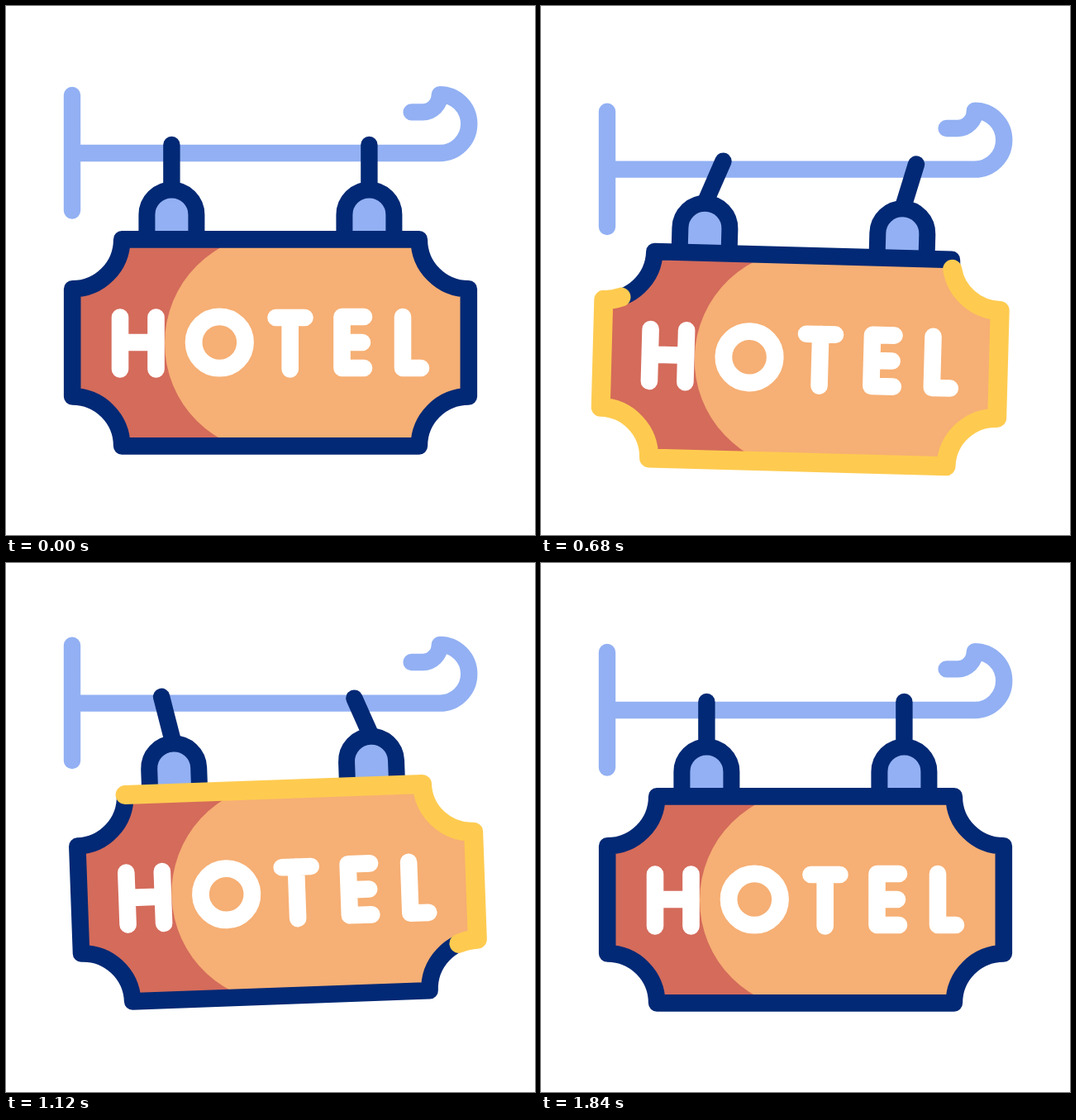
Write an HTML page with a canvas that moves like this. It is 640 px wide and 640 px high and loops after 2 s.

```html
<!DOCTYPE html>
<html lang="en">
<head>
<meta charset="utf-8">
<title>Hanging hotel sign</title>
<style>
  html, body { margin: 0; width: 100%; height: 100%; overflow: hidden; background: #fff; }
  canvas { display: block; width: 100vmin; height: 100vmin; }
</style>
</head>
<body>
<canvas id="stage" width="640" height="640" role="img" aria-label="HOTEL"></canvas>
<script>
const ctx = document.getElementById('stage').getContext('2d');
const SKY = '#92b0f3', NAVY = '#022975', RED = '#d46b5b', SAND = '#f6af74', GOLD = '#fecb50';
const LOOP = 2000, STEP = 40;
const BAR_Y = 178, HALF = Math.PI / 2;
const box = { l: 80.2, r: 559.8, t: 282.4, b: 532.4, notch: 60 };

// Swing keyframe times: rest, low point, high point, rest.
const KEYS = [130, 565, 1145, 1735];

function ease(t, from, to) {
  const x = Math.min(1, Math.max(0, (t - from) / (to - from)));
  return 0.5 - 0.5 * Math.cos(Math.PI * x);
}

// Goes from rest to low, to high and back to rest.
function swing(t, rest, low, high) {
  const values = [rest, low, high, rest];
  let v = rest;
  for (let i = 0; i < 3; i++) {
    v += (values[i + 1] - values[i]) * ease(t, KEYS[i], KEYS[i + 1]);
  }
  return v;
}

function stroke(path, color, width) {
  ctx.strokeStyle = color;
  ctx.lineWidth = width;
  ctx.stroke(path);
}

function fill(path, color) {
  ctx.fillStyle = color;
  ctx.fill(path);
}

function boardPath() {
  const { l, r, t, b, notch } = box;
  const p = new Path2D();
  p.moveTo(l + notch, t);
  p.arc(l, t, notch, 0, HALF);
  p.arc(l, b, notch, -HALF, 0);
  p.arc(r, b, notch, 2 * HALF, 3 * HALF);
  p.arc(r, t, notch, HALF, 2 * HALF);
  p.lineTo(l + notch, t);
  return p;
}

const board = boardPath();
const boardLength = 4 * HALF * box.notch
  + 2 * (box.r - box.l + box.b - box.t - 4 * box.notch);

const bracket = new Path2D(
  'M80 108V247.5 M80 178H524.8 A35.4 35.4 0 0 0 524.8 107.2 A21 21 0 0 1 504 128.4 H490.6');

const light = new Path2D();
light.arc(325, 408, 133, 3 * HALF, HALF, true);
light.lineTo(325, 560);
light.lineTo(580, 560);
light.lineTo(580, 260);
light.lineTo(325, 260);
light.closePath();

const letters = new Path2D(
  'M138 376.5V439.5 M181.5 376.5V439.5 M138 407H181.5' +
  'M326.5 377H361.5 M343.7 377V439.5' +
  'M433 376H406.5V438H433 M406.5 407H431' +
  'M480 376V438H502');
const ring = new Path2D();
ring.arc(258.3, 407, 31.2, 0, 4 * HALF);

function dome(x) {
  const p = new Path2D();
  p.moveTo(x - 30, 282);
  p.lineTo(x - 30, 252.5);
  p.arc(x, 252.5, 30, 2 * HALF, 4 * HALF);
  p.lineTo(x + 30, 282);
  return p;
}

const hangers = [
  { x: 200.4, lowX: 23.5, highX: -12.5, lowY: -10.2, highY: -7.8 },
  { x: 439.4, lowX: 18, highX: -18.2, lowY: -6, highY: -6 }
].map(h => ({ ...h, dome: dome(h.x) }));

// The foot follows the board, the top rides on the bar.
function drawRod(h, t, drop, angle) {
  const dx = h.x - 320, dy = 220 - BAR_Y;
  const c = Math.cos(angle), s = Math.sin(angle);
  const rod = new Path2D();
  rod.moveTo(h.x + swing(t, 0, h.lowX, h.highX),
             BAR_Y + drop + swing(t, -10, h.lowY, h.highY));
  rod.lineTo(320 + dx * c - dy * s, BAR_Y + drop + dx * s + dy * c);
  stroke(rod, NAVY, 20.4);
}

function drawBoard(t) {
  for (const h of hangers) {
    fill(h.dome, SKY);
    stroke(h.dome, NAVY, 20);
  }

  ctx.save();
  ctx.clip(board);
  ctx.fillStyle = RED;
  ctx.fillRect(60, 260, 520, 300);
  fill(light, SAND);
  ctx.restore();

  stroke(board, NAVY, 20.6);
  stroke(letters, '#fff', 20.6);
  stroke(ring, '#fff', 20.8);

  const head = ease(t, 60, 1015) * boardLength;
  const tail = ease(t, 510, 1654) * boardLength;
  if (t >= 120 && head - tail > 0.5) {
    ctx.setLineDash([head - tail, boardLength * 2]);
    ctx.lineDashOffset = -tail;
    stroke(board, GOLD, 23);
    ctx.setLineDash([]);
  }
}

function draw(t) {
  const drop = swing(t, 0, 22.5, -8.5);
  const angle = swing(t, 0, 1.95, -2.1) * Math.PI / 180;

  ctx.fillStyle = '#fff';
  ctx.fillRect(0, 0, 640, 640);
  ctx.lineCap = ctx.lineJoin = 'round';

  ctx.save();
  ctx.translate(0, drop);
  stroke(bracket, SKY, 20.4);
  ctx.restore();

  for (const h of hangers) drawRod(h, t, drop, angle);

  ctx.save();
  ctx.translate(320, BAR_Y + drop);
  ctx.rotate(angle);
  ctx.translate(-320, -BAR_Y);
  drawBoard(t);
  ctx.restore();
}

const start = performance.now();
function tick() {
  const t = (performance.now() - start) % LOOP;
  draw(Math.floor(t / STEP) * STEP);
  requestAnimationFrame(tick);
}
tick();
</script>
</body>
</html>
```
